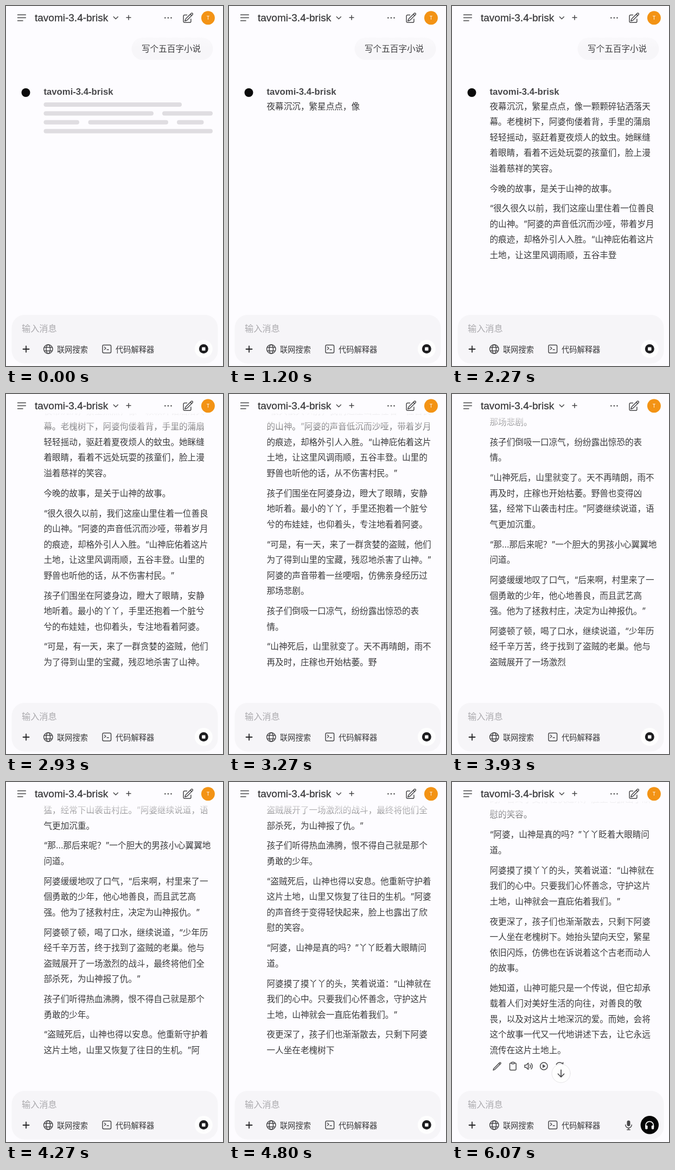
Animation, 400 px wide and 661 px high, one loop 6.14 s. Source, as an HTML page:

```html
<!DOCTYPE html>
<html lang="zh-CN">
<head>
<meta charset="utf-8">
<title>Chat</title>
<style>
  html, body { margin: 0; width: 100%; height: 100%; overflow: hidden; background: #fdfcff; }
  svg { display: block; }
  text {
    font-family: Inter, "Noto Sans CJK SC", "Noto Sans CJK", sans-serif;
    font-size: 15.6px; fill: #39393b; text-spacing-trim: space-all; white-space: pre;
  }
  .latin { font-family: "Liberation Sans", Arial, sans-serif; }
  .tool { font-size: 14.25px; font-weight: 500; }
  .line { fill: none; stroke: #48484a; stroke-width: 1.5; stroke-linecap: round; stroke-linejoin: round; }
  .thin { vector-effect: non-scaling-stroke; }
</style>
</head>
<body>
<svg width="400" height="661" viewBox="0 0 400 661">
  <defs>
    <linearGradient id="fade" x1="0" y1="0" x2="0" y2="1">
      <stop offset=".44" stop-color="#fdfcff"/>
      <stop offset="1" stop-color="#fdfcff" stop-opacity="0"/>
    </linearGradient>
  </defs>

  <g id="chat">
    <rect x="231.5" y="58" width="150" height="41" rx="20.5" fill="#f7f6f9"/>
    <text x="250" y="83.5">写个五百字小说</text>
    <circle cx="36.5" cy="159" r="8" fill="#0b0b0c"/>
    <text class="latin" x="69.5" y="162.5" style="font-size:16.7px;font-weight:700;fill:#48484b">tavomi-3.4-brisk</text>
    <g id="bars" fill="#dfdde1"></g>
    <g id="story"></g>
  </g>

  <rect width="400" height="78" fill="url(#fade)"/>

  <g id="header" class="line">
    <path d="M21.5 16.2h14.8M21.5 21.6h14.8M21.5 27h9.5"/>
    <path d="M198.3 19.7l4 4 4-4M222 21.3h8M226 17.3v8"/>
    <path class="thin" transform="translate(324.3 11) scale(.92)" d="m16.862 4.487 1.687-1.688a1.875 1.875 0 1 1 2.652 2.652L10.582 16.07a4.5 4.5 0 0 1-1.897 1.13L6 18l.8-2.685a4.5 4.5 0 0 1 1.13-1.897l8.932-8.931Zm0 0L19.5 7.125M18 14v4.75A2.25 2.25 0 0 1 15.75 21H5.25A2.25 2.25 0 0 1 3 18.75V8.25A2.25 2.25 0 0 1 5.25 6H10"/>
    <g fill="#48484a" stroke="none">
      <circle cx="293.3" cy="21.8" r="1.25"/><circle cx="298.9" cy="21.8" r="1.25"/><circle cx="304.5" cy="21.8" r="1.25"/>
    </g>
  </g>
  <text class="latin" x="53" y="27.6" style="font-size:19px;stroke:#39393b;stroke-width:.3px">tavomi-3.4-brisk</text>
  <circle cx="372.4" cy="21.8" r="12.5" fill="#f39315"/>
  <text x="372.4" y="25" text-anchor="middle" style="font-size:9px;fill:#fff">T</text>

  <g id="actions" class="line">
    <path class="thin" transform="translate(74.4 513.3) scale(.72)" d="M16.862 4.487l1.687-1.688a1.875 1.875 0 112.652 2.652L6.832 19.82a4.5 4.5 0 01-1.897 1.13l-2.685.8.8-2.685a4.5 4.5 0 011.13-1.897L16.863 4.487zM16.862 4.487L19.5 7.125"/>
    <rect x="106.5" y="516" width="11.6" height="13" rx="2"/>
    <rect x="109.6" y="514.6" width="5.4" height="3" rx="1" fill="#fdfcff"/>
    <path d="M134 519.7h2.6l4-3.6v11.6l-4-3.6h-2.6zM143.6 519.2a4 4 0 0 1 0 5.4M146 516.8a7.4 7.4 0 0 1 0 10.2"/>
    <circle cx="169.3" cy="521.8" r="6.7"/>
    <path d="M167.6 519l4.4 2.8-4.4 2.8z" fill="#48484a" stroke-width=".8"/>
    <path d="M192.3 518.6a6.7 6.7 0 0 1 12 0M204.6 515v3.8h-3.8"/>
    <circle cx="201" cy="535" r="17" fill="#fefefe" stroke="#e6e5e8" stroke-width="1"/>
    <path d="M201 528.5v13M195.4 536l5.6 5.7 5.6-5.7" stroke-width="1.7"/>
  </g>

  <rect x="10.5" y="567" width="380" height="89.5" rx="24" fill="#f6f5f8"/>
  <text x="29" y="598.4" style="font-size:16.2px;fill:#aaa9ad">输入消息</text>
  <text class="tool" x="94" y="635.6">联网搜索</text>
  <text class="tool" x="202" y="635.6">代码解释器</text>
  <g class="line">
    <path d="M31.5 630h11M37 624.5v11" stroke="#262628" stroke-width="1.8"/>
    <circle cx="77.8" cy="630" r="8.2"/>
    <ellipse cx="77.8" cy="630" rx="3.7" ry="8.2"/>
    <path d="M70.6 626.8h14.4M70.6 633.2h14.4"/>
    <rect x="178" y="622.6" width="15.6" height="14.4" rx="2.2"/>
    <path d="M181.5 626.3l2.5 2.2-2.5 2.2M186.2 631h3"/>
  </g>

  <g id="stop">
    <circle cx="364.3" cy="629.6" r="16.5" fill="#fefefe"/>
    <circle cx="364.3" cy="629.6" r="8.5" fill="#1d1d1f"/>
    <rect x="361.1" y="626.4" width="6.4" height="6.4" rx="1.2" fill="#fff"/>
  </g>
  <g id="voice">
    <g class="line">
      <rect x="322.5" y="621.5" width="6" height="10.5" rx="3" fill="#48484a" stroke="none"/>
      <path d="M319.8 629.5a5.7 5.7 0 0 0 11.4 0M325.5 635.3v3.2M322.8 638.5h5.4"/>
    </g>
    <circle cx="364.3" cy="629.8" r="16.7" fill="#050505"/>
    <path d="M357 633v-2.5a7.2 7.2 0 0 1 14.4 0v2.5" fill="none" stroke="#fff" stroke-width="1.7"/>
    <rect x="356.2" y="630.6" width="4.4" height="7" rx="1.7" fill="#fff"/>
    <rect x="367.8" y="630.6" width="4.4" height="7" rx="1.7" fill="#fff"/>
  </g>
</svg>

<script>
const story = `夜幕沉沉，繁星点点，像一颗颗碎钻洒落天
幕。老槐树下，阿婆佝偻着背，手里的蒲扇
轻轻摇动，驱赶着夏夜烦人的蚊虫。她眯缝
着眼睛，看着不远处玩耍的孩童们，脸上漫
溢着慈祥的笑容。

今晚的故事，是关于山神的故事。

“很久很久以前，我们这座山里住着一位善良
的山神。”阿婆的声音低沉而沙哑，带着岁月
的痕迹，却格外引人入胜。“山神庇佑着这片
土地，让这里风调雨顺，五谷丰登。山里的
野兽也听他的话，从不伤害村民。”

孩子们围坐在阿婆身边，瞪大了眼睛，安静
地听着。最小的丫丫，手里还抱着一个脏兮
兮的布娃娃，也仰着头，专注地看着阿婆。

“可是，有一天，来了一群贪婪的盗贼，他们
为了得到山里的宝藏，残忍地杀害了山神。”
阿婆的声音带着一丝哽咽，仿佛亲身经历过
那场悲剧。

孩子们倒吸一口凉气，纷纷露出惊恐的表
情。

“山神死后，山里就变了。天不再晴朗，雨不
再及时，庄稼也开始枯萎。野兽也变得凶
猛，经常下山袭击村庄。”阿婆继续说道，语
气更加沉重。

“那...那后来呢？”一个胆大的男孩小心翼翼地
问道。

阿婆缓缓地叹了口气，“后来啊，村里来了一
個勇敢的少年，他心地善良，而且武艺高
强。他为了拯救村庄，决定为山神报仇。”

阿婆顿了顿，喝了口水，继续说道，“少年历
经千辛万苦，终于找到了盗贼的老巢。他与
盗贼展开了一场激烈的战斗，最终将他们全
部杀死，为山神报了仇。”

孩子们听得热血沸腾，恨不得自己就是那个
勇敢的少年。

“盗贼死后，山神也得以安息。他重新守护着
这片土地，山里又恢复了往日的生机。”阿婆
的声音终于变得轻快起来，脸上也露出了欣
慰的笑容。

“阿婆，山神是真的吗？”丫丫眨着大眼睛问
道。

阿婆摸了摸丫丫的头，笑着说道：“山神就在
我们的心中。只要我们心怀善念，守护这片
土地，山神就会一直庇佑着我们。”

夜更深了，孩子们也渐渐散去，只剩下阿婆
一人坐在老槐树下。她抬头望向天空，繁星
依旧闪烁，仿佛也在诉说着这个古老而动人
的故事。

她知道，山神可能只是一个传说，但它却承
载着人们对美好生活的向往，对善良的敬
畏，以及对这片土地深沉的爱。而她，会将
这个故事一代又一代地讲述下去，让它永远
流传在这片土地上。`;

const LOOP = 6140, START = 1130, DONE = 4870;
const FIRST_Y = 183.8, LAST_Y = 492, PITCH = 28.5, GAP = 8.35;
const $ = id => document.getElementById(id);

function add(parent, tag, attrs) {
  const el = document.createElementNS('http://www.w3.org/2000/svg', tag);
  for (const name in attrs) el.setAttribute(name, attrs[name]);
  return parent.appendChild(el);
}

// Loading placeholder: x, centre y, width
[[69.5, 181, 254.5], [69.5, 197.3, 202.5], [288, 197.3, 93], [69.5, 213.5, 65.5],
 [151.5, 213.5, 147.5], [315, 213.5, 49.5], [69.5, 229.8, 311.5]]
  .forEach(([x, y, width]) => add($('bars'), 'rect', { x, y: y - 4, width, height: 8, rx: 4 }));

const lines = [];
let offset = 0, nextY = FIRST_Y;
for (const text of story.split('\n')) {
  if (text) {
    const el = add($('story'), 'text', { x: 69.5, y: nextY + 5.9 });
    lines.push({ text, start: offset, y: nextY, el });
    nextY += PITCH;
  } else {
    nextY += GAP;
  }
  offset += text.length + 1;
}

// Typing progress: time and the last words written by then
const after = words => story.indexOf(words) + words.length;
const progress = [
  [START, 0],
  [2000, after('阿婆的声音低沉')],
  [2270, after('五谷丰登')],
  [2930, after('杀害了山神。')],
  [3600, after('村里来了一')],
  [4270, after('生机。”阿')],
  [4800, after('坐在老槐树下')],
  [DONE, story.length]
];

function typed(t) {
  if (t < START) return 0;
  if (t >= DONE) return story.length;
  const i = progress.findIndex(step => step[0] > t);
  const [t0, n0] = progress[i - 1], [t1, n1] = progress[i];
  return Math.round(n0 + (n1 - n0) * (t - t0) / (t1 - t0));
}

// The picture updates 15 times a second, on 10 ms marks
function tick(t) {
  const rest = t % 200;
  return t - rest + (rest >= 130 ? 130 : rest >= 70 ? 70 : 0);
}

function show(id, on) {
  $(id).style.display = on ? '' : 'none';
}

function draw(t) {
  const count = typed(t);
  let y = FIRST_Y;
  for (const line of lines) {
    const part = line.text.slice(0, Math.max(0, count - line.start));
    if (line.el.textContent !== part) line.el.textContent = part;
    if (part) y = line.y;
  }
  $('chat').setAttribute('transform', `translate(0 ${Math.min(0, LAST_Y - y)})`);
  $('bars').style.opacity = 0.75 + 0.25 * Math.cos(Math.PI * t / 1000);
  show('bars', t < START);
  show('stop', t < DONE);
  show('voice', t >= DONE);
  show('actions', t >= DONE);
}

const begin = performance.now();
let last = -1;
function frame() {
  const t = tick((performance.now() - begin) % LOOP);
  if (t !== last) draw(last = t);
  requestAnimationFrame(frame);
}
frame();
</script>
</body>
</html>
```
